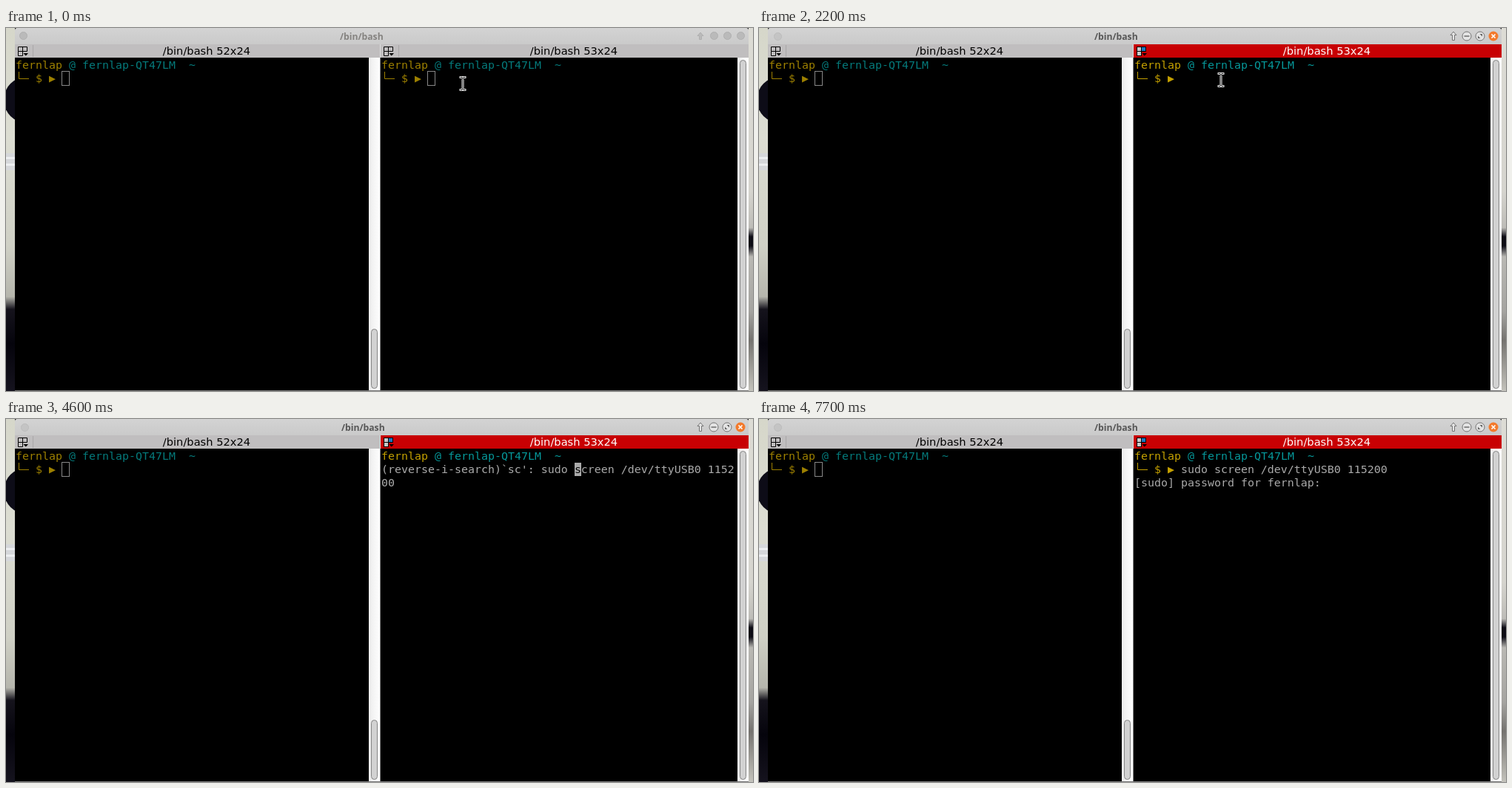
An HTML page that plays this animation: 1009x490 px, repeating every 8000 ms.

```html
<!DOCTYPE html>
<html lang="en">
<head>
<meta charset="utf-8">
<title>Terminal</title>
<style>
  html, body { margin: 0; width: 100%; height: 100%; overflow: hidden; background: #000; }
  svg { display: block; width: 1009px; height: 490px; }
  text { white-space: pre; }
  .mono { font: 14.95px "DejaVu Sans Mono", monospace; fill: #aaa; }
  .tab { font: 14.667px "DejaVu Sans", sans-serif; text-anchor: middle; }
  .title { font: bold 12.2px "Open Sans", "Noto Sans", sans-serif; }
  .pane { --user: #9d8000; --host: #057a7b; }
  .user { fill: var(--user); }
  .host { fill: var(--host); }
  .line { fill: none; stroke: var(--user); }
  .thumb { fill: #d2d2d2; stroke: #858585; }
  .on { display: none; }
  .focus .on { display: inline; }
  .focus .off { display: none; }
  .focus #right { --user: #c4a000; --host: #06989a; }
</style>
</head>
<body>
<svg id="stage" viewBox="0 0 1009 490">
  <defs>
    <linearGradient id="bar" x2="0" y2="1">
      <stop stop-color="#d3d3d3"/><stop offset="1" stop-color="#cacaca"/>
    </linearGradient>
    <linearGradient id="trough">
      <stop stop-color="#ececec"/><stop offset="1" stop-color="#fff"/>
    </linearGradient>
    <linearGradient id="wallL" x2="0" y2="1">
      <stop stop-color="#d6d7ca"/><stop offset=".3" stop-color="#dcddd2"/>
      <stop offset=".6" stop-color="#cfd0c5"/><stop offset=".74" stop-color="#b5b5ac"/>
      <stop offset=".775" stop-color="#15131c"/><stop offset=".87" stop-color="#05040c"/>
      <stop offset="1" stop-color="#15131e"/>
    </linearGradient>
    <linearGradient id="wallR" x2="0" y2="1">
      <stop stop-color="#dddcd5"/><stop offset=".45" stop-color="#d5d4ce"/>
      <stop offset=".55" stop-color="#bdbcb7"/><stop offset=".575" stop-color="#0c0b14"/>
      <stop offset=".6" stop-color="#0c0b14"/><stop offset=".63" stop-color="#b9b8b3"/>
      <stop offset=".78" stop-color="#a5a4a0"/><stop offset=".86" stop-color="#75736f"/>
      <stop offset="1" stop-color="#c3c2bb"/>
    </linearGradient>

    <g id="head" class="mono">
      <text class="user" y="55">fernlap</text>
      <text class="host" x="72" y="55">@ fernlap-QT47LM  ~</text>
    </g>
    <g id="lead" class="mono">
      <path class="line" d="M4.5 59V68.5H18"/>
      <text class="user" x="27" y="73">$ ▶</text>
    </g>
    <rect id="hollow" x="62.5" y="58.5" width="10" height="19" fill="none" stroke="#888"/>
    <g id="grid">
      <path d="M.5 .5H12.5V6.5H.5ZM.5 6.5V12.5H6.5V.5" fill="none" stroke="#000"/>
      <path d="M7.5 9H14L10.7 12.5Z"/>
    </g>
  </defs>

  <!-- desktop -->
  <rect width="12" height="490" fill="url(#wallL)"/>
  <circle cx="28" cy="97" r="31" fill="#0d0c17"/>
  <path d="M0 169H12V192H0Z" fill="#d5d7da"/>
  <path d="M0 175.5H12M0 184.5H12" stroke="#eceef0" stroke-width="3"/>
  <rect x="1003" width="6" height="490" fill="url(#wallR)"/>

  <!-- window frame -->
  <path d="M12 22V3Q12 0 15 0H1000Q1003 0 1003 3V22Z" fill="url(#bar)"/>
  <rect x="12" y="22" width="991" height="18" fill="#c0bebf"/>
  <rect x="12" y="40" width="478" height="449"/>
  <rect x="506" y="40" width="482" height="449"/>
  <rect x="490" y="40" width="15.5" height="449" fill="url(#trough)"/>
  <rect x="988" y="40" width="15" height="449" fill="url(#trough)"/>
  <rect class="thumb" x="493.5" y="406.5" width="8" height="80" rx="4"/>
  <rect class="thumb" x="991.5" y="43.5" width="8" height="443" rx="4"/>
  <path d="M12 489.5H1003" stroke="#777"/>
  <path d="M505.5 22V40" stroke="#dcdcdc"/>

  <g class="off">
    <text class="title" x="451" y="16" fill="#858380">/bin/bash</text>
    <g fill="#bababa" stroke="#b0b0b0">
      <circle cx="23.5" cy="10.5" r="5"/>
      <circle cx="956.5" cy="10.5" r="5"/>
      <circle cx="974.5" cy="10.5" r="5"/>
      <circle cx="992.5" cy="10.5" r="5"/>
      <path d="M938 6L942 10.5H939.5V15.5H936.5V10.5H934Z"/>
    </g>
  </g>
  <g class="on">
    <text class="title" x="453" y="16" fill="#575757">/bin/bash</text>
    <circle cx="25.5" cy="11.5" r="5" fill="#c4c4c4" stroke="#bcbcbc"/>
    <g fill="#e4e4e4" stroke="#747474">
      <path d="M938 5L942 9.5H939.5V16.5H936.5V9.5H934Z"/>
      <circle cx="956" cy="11" r="6"/>
      <circle cx="974" cy="11" r="6"/>
      <path d="M952.5 11H959.5" stroke-width="1.6"/>
      <path d="M971 10.5V14H974.5ZM973.5 8H977V11.5Z" fill="#666" stroke="none"/>
    </g>
    <circle cx="992" cy="11" r="6.5" fill="#f37a2c"/>
    <path d="M989.5 8.5L994.5 13.5M994.5 8.5L989.5 13.5" stroke="#fff" stroke-width="1.7"/>
    <rect x="506" y="22" width="497" height="18" fill="#c80003"/>
    <path d="M511 26H516V31H511ZM511 32H516V37H511Z" fill="#c9c9c9"/>
    <path d="M517 26H522V31H517Z" fill="#1c78c0"/>
  </g>

  <use href="#grid" x="16" y="25"/>
  <use href="#grid" x="510" y="25"/>
  <path d="M36.5 23V39" stroke="#a9a7a8"/>
  <path class="off" d="M530.5 23V39" stroke="#a9a7a8"/>
  <text class="tab" x="271" y="36">/bin/bash 52x24</text>
  <text class="tab off" x="767" y="36">/bin/bash 53x24</text>
  <text class="tab on" x="767" y="36" fill="#fff">/bin/bash 53x24</text>

  <!-- panes -->
  <g class="pane" transform="translate(13)">
    <use href="#head"/><use href="#lead"/><use href="#hollow"/>
  </g>
  <g class="pane" id="right" transform="translate(507)">
    <use href="#head"/><use href="#lead" id="prompt"/>
    <use href="#hollow" class="off"/>
    <text class="mono" id="row1" y="73"></text>
    <text class="mono" id="row2" y="91"></text>
    <g id="block">
      <rect width="9" height="18" fill="#aaa"/>
      <text class="mono" id="under" y="14" style="fill:#000"></text>
    </g>
  </g>

  <g id="mouse" fill="none" stroke-linecap="square">
    <path id="beam" d="M-3 -8.5H-1L0 -7.5L1 -8.5H3M0 -7.5V7.5M-3 8.5H-1L0 7.5L1 8.5H3" stroke="#f4f4f4" stroke-width="2.6"/>
    <use href="#beam" style="stroke:#000"/>
    <path d="M-3 -8.5H-1L0 -7.5L1 -8.5H3M0 -7.5V7.5M-3 8.5H-1L0 7.5L1 8.5H3" stroke="#000" stroke-width=".9"/>
  </g>
</svg>
<script>
const LOOP = 8000, COLS = 53, CELL = 9;
const $ = id => document.getElementById(id);
const command = "sudo screen /dev/ttyUSB0 115200";
const password = "[sudo] password for fernlap: ";

// [time, x, y] of the pointer
const path = [
  [0, 617, 75], [100, 616, 75], [200, 618, 75], [600, 619, 75], [1000, 620, 75],
  [1400, 622, 75], [1500, 622, 74], [1600, 623, 73], [1700, 623, 72],
  [1800, 623, 71], [2200, 624, 70], [2300, 625, 69]
];

// [time, cursor shown]
const blink = [
  [0, 0], [400, 1], [1000, 0], [1600, 1], [2200, 0], [2800, 1], [3400, 0],
  [3600, 1], [5400, 0], [5900, 1], [6500, 0], [7000, 1], [7700, 0]
];

const idle = { prompt: true, rows: ["", ""], col: 7, row: 1 };
const entered = " ".repeat(7) + command;

function search(query, match = command) {
  const before = "(reverse-i-search)`" + query + "': ";
  const line = before + match;
  return {
    prompt: false,
    rows: [line.slice(0, COLS), line.slice(COLS)],
    col: before.length + Math.max(0, match.indexOf("screen")),
    row: 1
  };
}

const screens = [
  [0, idle],
  [3800, search("", "")],
  [4400, search("s")],
  [4600, search("sc")],
  [4900, search("scr")],
  [5900, { prompt: true, rows: [entered, ""], col: 13, row: 1 }],
  [7000, { prompt: true, rows: [entered, password], col: password.length, row: 2 }]
];
// each typed letter moves the prompt, and with it the match, one column right

const at = (list, t) => list.filter(step => step[0] <= t).pop();
const show = (id, on) => { $(id).style.display = on ? "" : "none"; };

function draw(t) {
  $("stage").classList.toggle("focus", t >= 400);

  const [, x, y] = at(path, t);
  $("mouse").setAttribute("transform", `translate(${x} ${y})`);
  show("mouse", t < 3800);

  const { prompt, rows, col, row } = at(screens, t)[1];
  show("prompt", prompt);
  $("row1").textContent = rows[0];
  $("row2").textContent = rows[1];

  show("block", at(blink, t)[1]);
  $("block").setAttribute("transform", `translate(${col * CELL} ${41 + row * 18})`);
  $("under").textContent = rows[row - 1][col] || "";
}

const start = performance.now();
function tick() {
  draw((performance.now() - start) % LOOP);
  requestAnimationFrame(tick);
}
tick();
</script>
</body>
</html>
```
